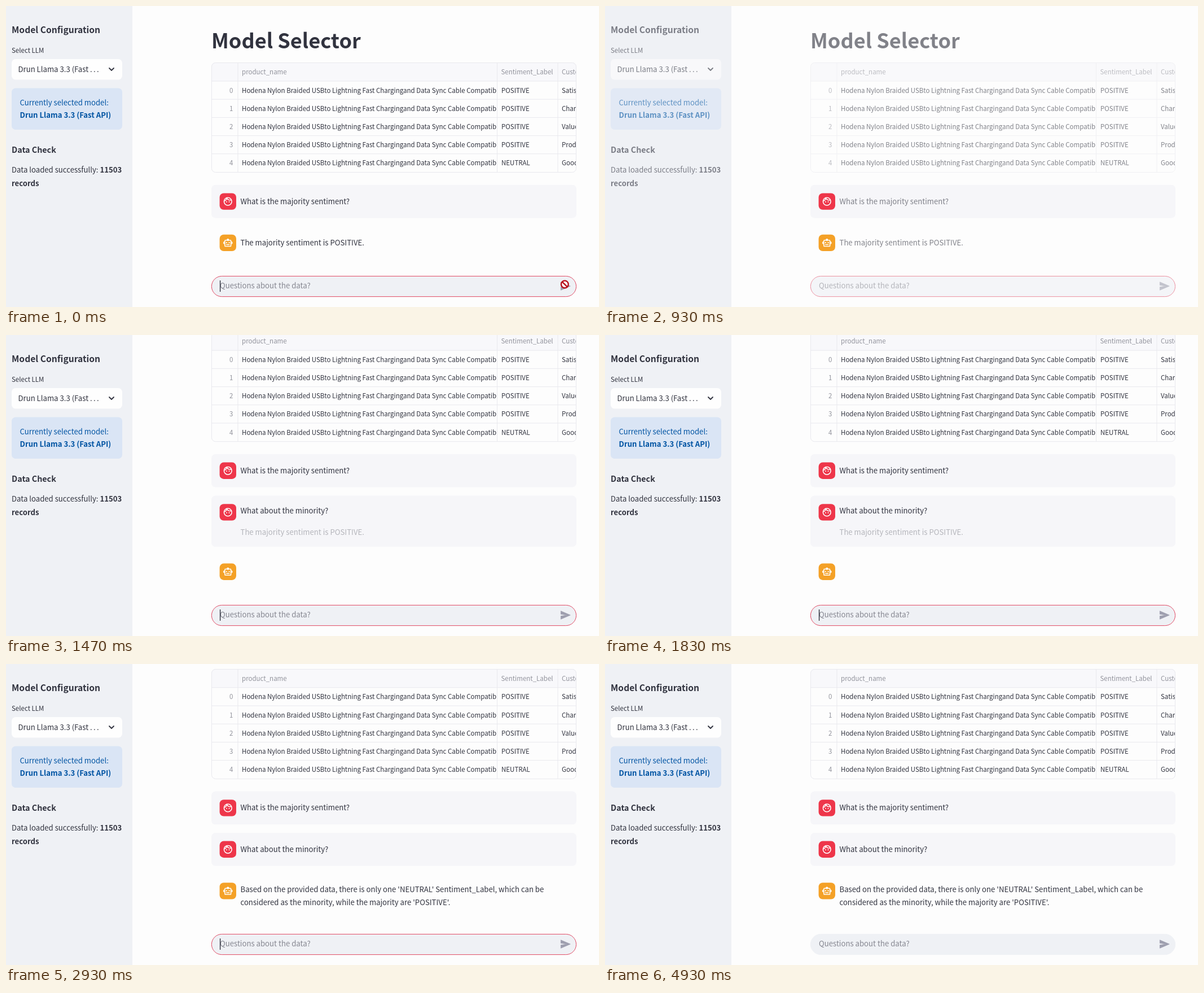
Recreate the animation shown at these times as an HTML page. Size 1051 by 533 pixels, loop 4960 ms.

```html
<!DOCTYPE html>
<html lang="en">
<head>
<meta charset="utf-8">
<title>Model Selector</title>
<style>
html, body { margin: 0; width: 100%; height: 100%; overflow: hidden; background: #fdfdfd; }
svg { display: block; width: 1051px; height: 533px; }
text { font: 13.17px "Noto Sans CJK JP", "Noto Sans CJK SC", "Noto Sans CJK", "Noto Sans", sans-serif; fill: #31333f; }
.small, .grid text { font-size: 11.52px; }
.b { font-weight: 700; }
.h1 { font-size: 36.15px; font-weight: 700; }
.h2 { font-size: 15.65px; font-weight: 700; }
.h3 { font-size: 14.3px; font-weight: 700; }
.info text { fill: #0054a3; }
.grid .dim { fill: #92939c; }
.grid path { stroke: #e9e9ee; fill: none; }
.bubble { fill: #f6f6f9; }
.icon { fill: none; stroke: #fff; stroke-width: 2; }
.icon .solid { fill: #fff; stroke: none; }
.hint { fill: #858690; }
</style>
</head>
<body>
<svg id="stage" viewBox="0 0 1051 533"></svg>
<script>
const LOOP = 4960;
const FADE_START = 200, RERUN = 1440, ANSWER = 2450, BLUR = 4850;

const text = (x, y, str, cls = '', extra = '') => `<text x="${x}" y="${y}" class="${cls}" ${extra}>${str}</text>`;
const bubble = (y, h = 58.6) => `<rect class="bubble" x="364" y="${y}" width="647" height="${h}" rx="7"/>`;
const say = (y, str) => text(415.5, y, str);

const FACE = `<circle cx="12" cy="12" r="9"/><path d="M3.5 11C7 10 9 7 9.5 4.5C11 7 14.5 10 20.5 8.7"/>
  <g class="solid"><circle cx="9" cy="13" r="1.3"/><circle cx="15" cy="13" r="1.3"/></g>`;
const ROBOT = `<rect x="5" y="6" width="14" height="14" rx="1"/><path d="M5 10H4a2 2 0 0 0 0 4h1M19 10h1a2 2 0 0 1 0 4h-1"/>
  <g class="solid"><circle cx="12" cy="5" r="2.8"/><circle cx="9" cy="11.5" r="1.5"/><circle cx="15" cy="11.5" r="1.5"/><path d="M8 15h8v2H8z"/></g>`;
const avatar = (cy, color, icon) => `<rect x="378.6" y="${cy - 14.7}" width="29.4" height="29.4" rx="7.3" fill="${color}"/>
  <g class="icon" transform="translate(384.1 ${cy - 9.2}) scale(.765)">${icon}</g>`;
const user = cy => avatar(cy, '#ee364a', FACE);
const bot = cy => avatar(cy, '#f4a127', ROBOT);

function table() {
  const product = 'Hodena Nylon Braided USBto Lightning Fast Chargingand Data Sync Cable Compatible';
  const topics = ['Satisfaction', 'Charging', 'Value', 'Product', 'Good'];
  let lines = 'M411 100V294.5M870.5 100V294.5M978 100V294.5';
  let cells = text(418, 121.3, 'product_name', 'dim') + text(877.5, 121.3, 'Sentiment_Label', 'dim') + text(985, 121.3, 'Customer', 'dim');
  topics.forEach((topic, i) => {
    const y = 153.6 + i * 32.2;
    lines += `M364 ${133 + i * 32.2}H1011`;
    cells += text(402.5, y, i, 'dim', 'text-anchor="end"')
      + text(418, y, product, '', 'clip-path="url(#nameCol)"')
      + text(878, y, i < 4 ? 'POSITIVE' : 'NEUTRAL') + text(985, y, topic);
  });
  return `<g class="grid stale"><g clip-path="url(#frame)">
    <path d="M364 100H1011V133H364z" style="fill:#f8f8fb;stroke:none"/><path d="${lines}"/>${cells}</g>
    <rect x="364.5" y="100.5" width="646" height="194" rx="7" fill="none" stroke="#e9e9ee"/></g>`;
}

const sidebar = `<rect width="224" height="533" fill="#eff1f5"/>
  <g class="stale">
    ${text(10, 48, 'Model Configuration', 'h2')}
    ${text(10, 82.5, 'Select LLM', 'small')}
    <rect x="10" y="94" width="196" height="36.5" rx="7" fill="#fefefe"/>
    ${text(21.5, 116.7, 'Drun Llama 3.3 (Fast <tspan letter-spacing="2.3">...</tspan>')}
    <path d="M183 110l4 4 4-4" fill="none" stroke="#31333f" stroke-width="1.8" stroke-linecap="round" stroke-linejoin="round"/>
    <g class="info">
      <rect x="10" y="145.5" width="196" height="73.5" rx="7" fill="#dae5f5"/>
      ${text(24.5, 175.8, 'Currently selected model:')}
      ${text(24.5, 197.8, 'Drun Llama 3.3 (Fast API)', 'b')}
    </g>
    ${text(10, 260, 'Data Check', 'h3')}
    ${text(10, 295.3, 'Data loaded successfully: <tspan class="b">11503</tspan>')}
    ${text(10, 319, 'records', 'b')}
  </g>`;

const page = `<g id="page">
    <g class="stale">${text(364, 75, 'Model Selector', 'h1')}</g>
    ${table()}
    ${bubble(316.8)}${user(346.1)}
    <g class="stale">${say(350.6, 'What is the majority sentiment?')}</g>
  </g>`;

const oldReply = 'The majority sentiment is POSITIVE.';
const views = `<g class="view">${bot(419.4)}<g class="stale">${say(424, oldReply)}</g></g>
  <g class="view">
    ${bubble(284.6, 90.4)}${user(313.9)}${say(315.6, 'What about the minority?')}
    <g class="ghost">${say(353.8, oldReply)}</g>${bot(419.2)}
  </g>
  <g class="view">
    ${bubble(299)}${user(328.3)}${say(332.8, 'What about the minority?')}
    ${bot(401.9)}${say(403.6, "Based on the provided data, there is only one 'NEUTRAL' Sentiment_Label, which can be")}
    ${say(427, "considered as the minority, while the majority are 'POSITIVE'.")}
  </g>`;

const input = `<g class="stale">
    <rect id="field" x="364.4" y="478.4" width="646.2" height="36.2" rx="18.1" fill="#eff1f5"/>
    ${text(379, 500.2, 'Questions about the data?', 'hint')}
    <path d="M2 21L23 12 2 3V10L17 12 2 14z" fill="#9d9eae" stroke="#9d9eae" stroke-linejoin="round" transform="translate(981.8 486.4) scale(.8)"/>
    <path id="caret" d="M379.6 486V506" stroke="#31333f" stroke-width="1.4"/>
  </g>
  <g id="pointer" fill="none" stroke="#b80f1c" stroke-width="2.4"><circle r="6.4" fill="#fdfdfd"/><path d="M-4.5 -4.5L4.5 4.5"/></g>`;

const stage = document.getElementById('stage');
stage.innerHTML = `<defs>
    <clipPath id="frame"><rect x="364" y="100" width="647" height="195" rx="7"/></clipPath>
    <clipPath id="nameCol"><rect x="411" y="100" width="459" height="195"/></clipPath>
  </defs>${sidebar}${page}${views}${input}`;

const get = id => document.getElementById(id);
const all = cls => [...document.getElementsByClassName(cls)];
const show = (el, on) => el.setAttribute('visibility', on ? 'visible' : 'hidden');
const clamp = v => Math.min(1, Math.max(0, v));
const stale = all('stale'), ghost = all('ghost')[0], viewList = all('view');
const scroll = [0, -105.8, -91.2];

function draw(t) {
  const step = t < RERUN ? 0 : t < ANSWER ? 1 : 2;
  const faded = 1 - .67 * clamp((t - FADE_START) / 1000) ** 1.67;
  stale.forEach(el => el.setAttribute('opacity', step ? 1 : faded));
  ghost.setAttribute('opacity', faded);
  viewList.forEach((el, i) => el.setAttribute('display', i === step ? 'inline' : 'none'));
  get('page').setAttribute('transform', `translate(0 ${scroll[step]})`);

  const focused = t < BLUR;
  get('field').setAttribute('stroke', focused ? '#e04a64' : '#eff1f5');
  const blink = (step ? t - RERUN : t) % 1000 < 500;
  show(get('caret'), focused && blink);

  // the pointer leaves through the lower right corner
  const out = clamp((t - 60) / 240) ** 2;
  get('pointer').setAttribute('transform', `translate(${990.3 + 72 * out} ${492.8 + 50 * out})`);
  show(get('pointer'), out < 1);
}

function tick() {
  draw(performance.now() % LOOP);
  requestAnimationFrame(tick);
}
tick();
</script>
</body>
</html>
```
